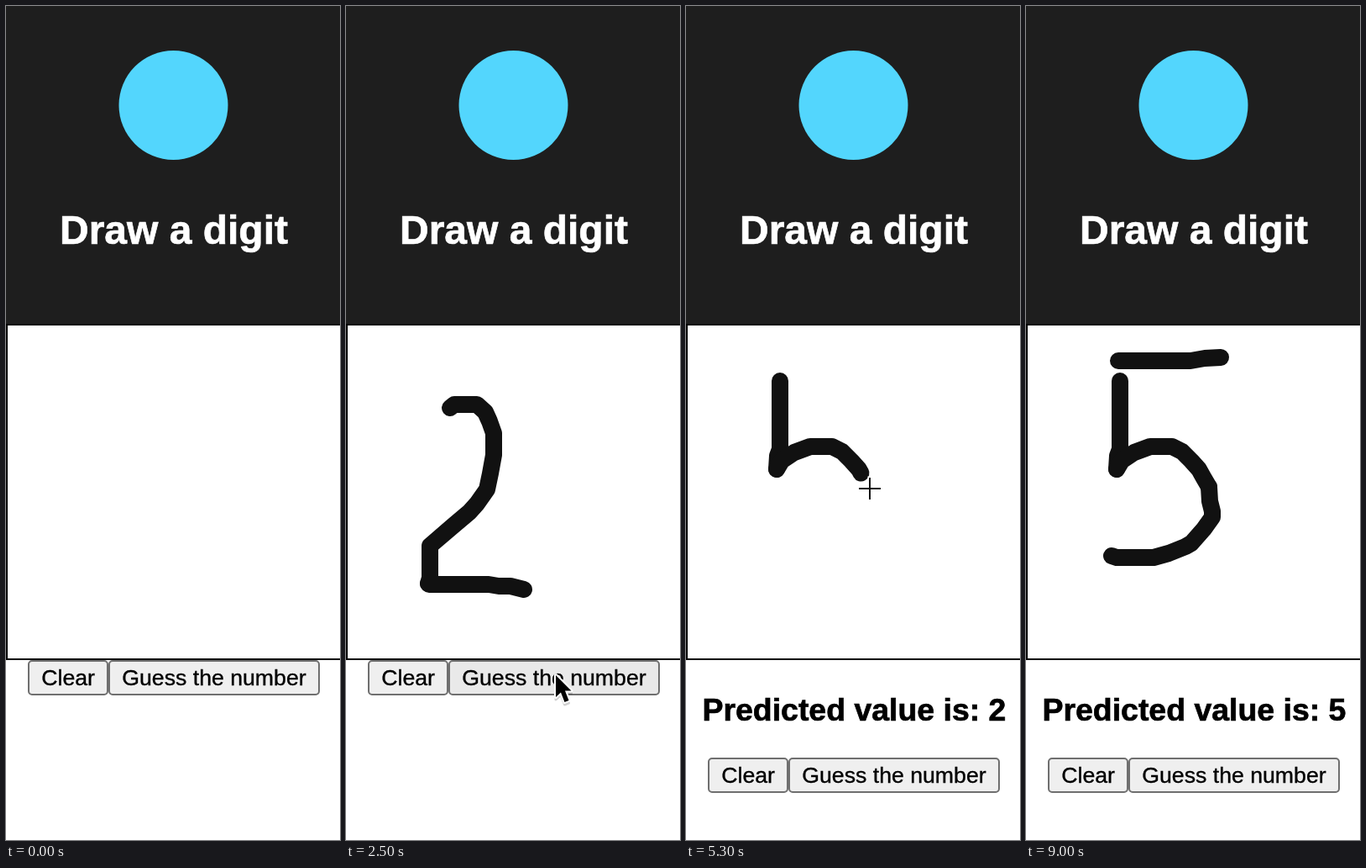
Write an HTML page that moves like this. It is 398 px wide and 992 px high and loops after 9.1 s.

```html
<!DOCTYPE html>
<html lang="en">
<head>
<meta charset="utf-8">
<title>Draw a digit</title>
<style>
  html, body { margin: 0; width: 100%; height: 100%; overflow: hidden; background: #fff; }
  svg { display: block; width: 398px; height: 992px; font-family: "Liberation Sans", Arial, sans-serif; }
  .heading { font-weight: 700; stroke-width: .7; }
  .button rect { fill: #efefef; stroke: #6f6f6f; stroke-width: 2; }
  .button text { font-size: 26.67px; stroke: #000; stroke-width: .35; }
  .button.hover rect { fill: #e9e9e9; }
  #ink path { fill: none; stroke: #111; stroke-width: 20; stroke-linecap: round; stroke-linejoin: round; }
</style>
</head>
<body>
<svg viewBox="0 0 398 992">
  <rect width="398" height="379" fill="#1e1e1e"/>
  <circle cx="199.5" cy="118" r="65" fill="#53d6fd"/>
  <text class="heading" x="200" y="282.5" font-size="48" fill="#fff" stroke="#fff" text-anchor="middle">Draw a digit</text>
  <rect x="1" y="379" width="410" height="398" fill="#fff" stroke="#000" stroke-width="2"/>
  <g id="ink"></g>
  <text class="heading" id="result" x="19.5" y="850" font-size="37.44" stroke="#000"></text>
  <g id="buttons">
    <g class="button" id="clear">
      <rect x="27" y="779" width="94" height="40" rx="4"/>
      <text x="42.3" y="808">Clear</text>
    </g>
    <g class="button" id="guess">
      <rect x="123" y="779" width="250" height="40" rx="4"/>
      <text x="138.3" y="808">Guess the number</text>
    </g>
  </g>
  <g id="cross" fill="none">
    <path d="M-14.5 0H14.5M0-14.5V14.5" stroke="#fff" stroke-width="5"/>
    <path d="M-13 0H13M0-13V13" stroke="#111" stroke-width="2"/>
  </g>
  <g id="arrow" stroke-linejoin="round">
    <path d="M0 0V26L6 20.5L10.5 32L15.5 30L11 18.5H18.5Z" transform="translate(0 3)" fill="#000" stroke="#000" stroke-width="3" opacity=".18"/>
    <path d="M0 0V26L6 20.5L10.5 32L15.5 30L11 18.5H18.5Z" fill="#000" stroke="#fff" stroke-width="4" paint-order="stroke"/>
  </g>
</svg>
<script>
const LOOP = 9100, STEP = 100;
const CLEARED = 3900, FIRST_GUESS = 2700, SECOND_GUESS = 7300, POINTER_GONE = 8700;
const $ = id => document.getElementById(id);

// Each pen stroke runs at constant speed; the ink trails the pointer by lag ms.
const strokes = [
  { from: 300, to: 1100, lag: 80, until: CLEARED,
    d: "M124 478L129 474H156L166 483L171 494L176 508V534L172 556L168 575L156 592L147 602L128 618L100 642V680L98 687" },
  { from: 1100, to: 2150, lag: 150, until: CLEARED,
    d: "M98 687L99 688H170L182 690H196L204 692L212 694" },
  { from: 4400, to: 4700, lag: 80, until: LOOP,
    d: "M112 446V527L109 535L108 551" },
  { from: 4700, to: 5300, lag: 80, until: LOOP,
    d: "M108 551L114 541L129 531L148 524H174L186 530L197 541L206 551L211 560L218 572" },
  { from: 5300, to: 5950, lag: 100, until: LOOP,
    d: "M218 572L219 589L222 601V608L212 622L197 639L190 643L170 651L152 656H108L102 654" },
  { from: 6250, to: 6580, lag: 100, until: LOOP,
    d: "M110 422H196L213 419L232 418" }
];

// Pointer moves outside the strokes: time, x, y.
const track = [
  [100, 79, 490], [300, 124, 477], [2150, 212, 694], [2250, 212, 694],
  [2500, 250, 796], [2750, 250, 796], [3100, 204, 700], [3600, 72, 911],
  [4000, 72, 911], [4100, 75, 900], [4400, 112, 446], [5950, 102, 654],
  [6250, 107, 422], [6580, 229, 416], [6700, 229, 416], [7000, 250, 860],
  [7200, 246, 907], [8100, 246, 907], [8500, 247, 909]
];

for (const s of strokes) {
  s.path = document.createElementNS("http://www.w3.org/2000/svg", "path");
  s.path.setAttribute("d", s.d);
  $("ink").append(s.path);
  s.length = s.path.getTotalLength();
}

const clamp = v => Math.min(1, Math.max(0, v));
const progress = (s, t) => clamp((t - s.from) / (s.to - s.from));
const show = (el, on) => el.setAttribute("visibility", on ? "visible" : "hidden");
const place = (el, x, y) => el.setAttribute("transform", `translate(${Math.round(x)} ${Math.round(y)})`);

function pointerAt(t) {
  const active = strokes.find(s => t >= s.from && t < s.to);
  if (active) return active.path.getPointAtLength(active.length * progress(active, t));
  const next = track.findIndex(k => k[0] > t);
  if (next <= 0) {
    const [, x, y] = track[next ? track.length - 1 : 0];
    return { x, y };
  }
  const [t0, x0, y0] = track[next - 1], [t1, x1, y1] = track[next];
  const u = (t - t0) / (t1 - t0), e = u * u * (3 - 2 * u);
  return { x: x0 + (x1 - x0) * e, y: y0 + (y1 - y0) * e };
}

function render(t) {
  for (const s of strokes) {
    const inkTime = t - s.lag;
    show(s.path, inkTime >= s.from && t < s.until);
    s.path.setAttribute("stroke-dasharray", `${s.length * progress(s, inkTime) + 0.01} 2000`);
  }

  const guessed = t >= FIRST_GUESS;
  const shift = guessed ? 116 : 0;
  $("result").textContent = guessed ? `Predicted value is: ${t < SECOND_GUESS ? 2 : 5}` : "";
  place($("buttons"), 0, shift);

  const { x, y } = pointerAt(t);
  const visible = t >= 100 && t < POINTER_GONE;
  const onCanvas = y < 778;
  show($("cross"), visible && onCanvas);
  show($("arrow"), visible && !onCanvas);
  place($("cross"), x + 1, y + 2);
  place($("arrow"), x, y);

  const onButtons = visible && y >= 778 + shift && y < 820 + shift;
  $("clear").classList.toggle("hover", onButtons && x >= 26 && x < 122);
  $("guess").classList.toggle("hover", onButtons && x >= 122 && x < 374);
}

const start = performance.now();
function tick() {
  const t = (performance.now() - start) % LOOP;
  render(Math.floor(t / STEP) * STEP);
  requestAnimationFrame(tick);
}
tick();
</script>
</body>
</html>
```
